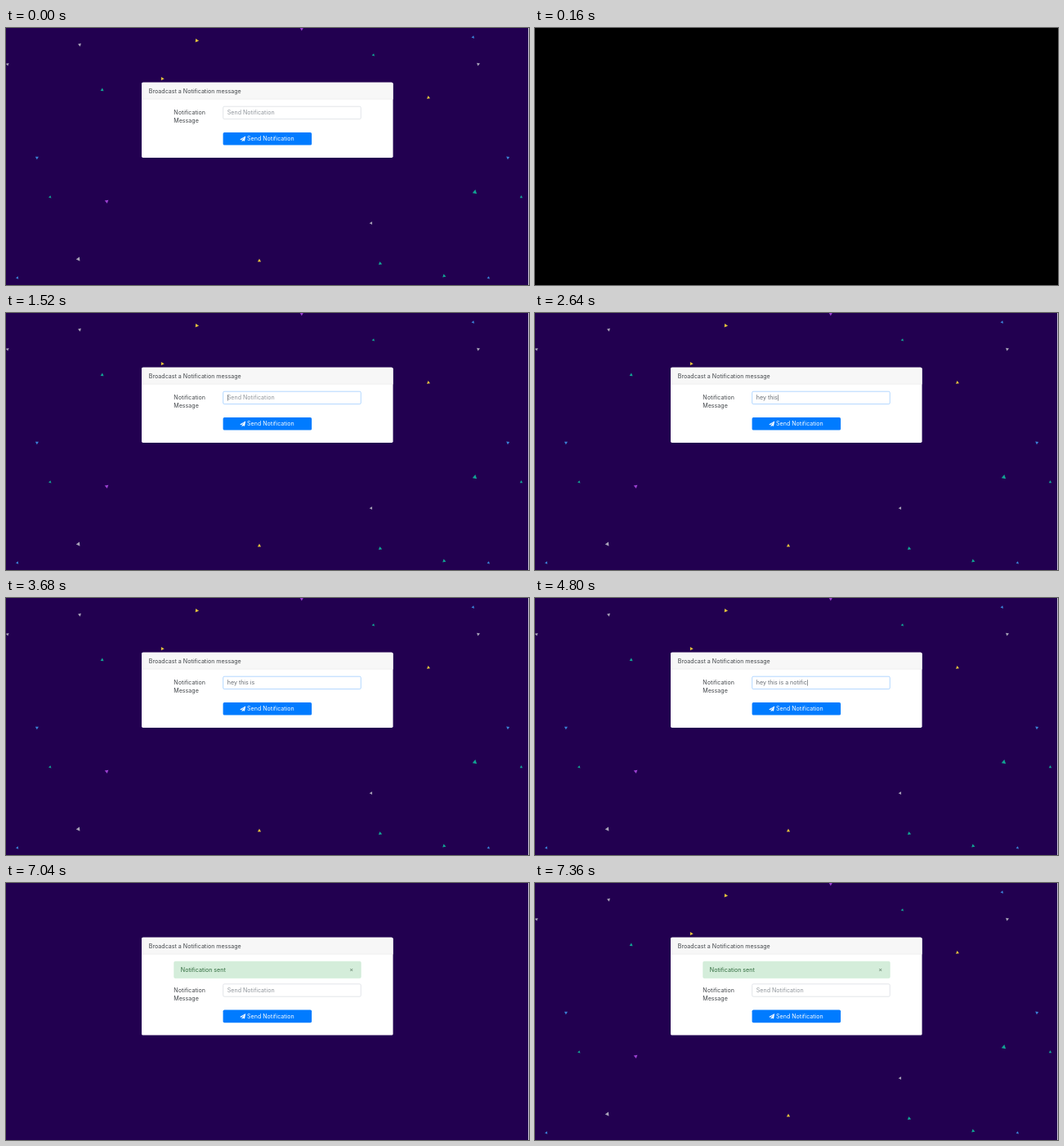
These frames come from a looping animation (640x315 px, 8000 ms). An HTML page:

```html
<!DOCTYPE html>
<html lang="en">
<head>
<meta charset="utf-8">
<title>Broadcast a Notification message</title>
<style>
  html, body { margin: 0; width: 100%; height: 100%; overflow: hidden; background: #220050; }
  svg { display: block; width: 100vw; height: 100vh; }
  text { font: 400 7.1px Inter, "Open Sans", sans-serif; fill: #43474b; white-space: pre; }
  #hint { fill: #8f959b; }
  #typed { fill: #686e75; font-size: 7.05px; }
  #alert text { fill: #2f6b3d; }
  #button text { fill: #fff; }
</style>
</head>
<body>
<svg viewBox="0 0 640 315" preserveAspectRatio="none">
  <rect width="640" height="315" fill="#220050"/>
  <g id="confetti"></g>
  <rect x="639" width="1" height="315" fill="#cfc8d8"/>

  <rect id="card" x="166" y="66.8" width="307.6" height="92.2" rx="1.7" fill="#fff"/>
  <path d="M166 87.2V68.5a1.7 1.7 0 0 1 1.7-1.7H471.9a1.7 1.7 0 0 1 1.7 1.7V87.2Z" fill="#f7f7f7"/>
  <path d="M166 87.2H473.6" stroke="#dfdfdf" stroke-width=".45"/>
  <text x="174.8" y="79.6">Broadcast a Notification message</text>

  <g id="alert">
    <rect x="205.7" y="96.2" width="228.6" height="20.4" rx="1.5" fill="#d4edda" stroke="#c3e6cb" stroke-width=".45"/>
    <text x="213.8" y="108.9">Notification sent</text>
    <path d="M421.2 105l3 3m0-3l-3 3" stroke="#5d7a65" stroke-width=".8"/>
  </g>

  <g id="form">
    <text x="205.3" y="106.4">Notification</text>
    <text x="205.3" y="116.4">Message</text>
    <rect id="field" x="265.7" y="96.2" width="168.6" height="15.4" rx="1.6" fill="#fff" stroke-width=".6"/>
    <text id="hint" x="270.8" y="106.4">Send Notification</text>
    <text id="typed" x="270.8" y="106.4"></text>
    <rect id="caret" y="100.2" width=".6" height="7.4" fill="#495057"/>
    <g id="button">
      <rect id="ring" x="264.7" y="127.1" width="110.3" height="17.4" rx="2.6" fill="none" stroke="#80bdff" stroke-width="1.4"/>
      <rect id="face" x="265.6" y="128" width="108.5" height="15.6" rx="1.7"/>
      <path transform="translate(286.2 132.4)" d="M7 0L0 4L1.7 4.8L6 1.2L2.5 5.2V7L3.7 5.6L5.8 6.4Z" fill="#fff"/>
      <text x="295" y="138.4">Send Notification</text>
    </g>
  </g>
  <rect id="blackout" width="640" height="315"/>
</svg>
<script>
const LOOP = 8000;
const MESSAGE = "hey this is a notification";
// Time of each keystroke
const KEYS = [
  1600, 1680, 1840, 1920,
  2400, 2480, 2560, 2640, 2880,
  3200, 3280, 3920, 4000, 4160,
  4240, 4400, 4480, 4560, 4640, 4720, 4800, 4960, 5040, 5120, 5280, 5360
];
// Caret switches on, off, on, ...
const BLINKS = [800, 1200, 1520, 2000, 2320, 2960, 3200, 3680, 3920, 5440, 5760, 6240];
const SENT = 7040;

const COLORS = { w: "#a9a3b8", y: "#e3c23c", p: "#9b3fd0", b: "#3b82d8", t: "#12a594" };
// colour, x, y, radius, turn in degrees
const CONFETTI = [
  ["w", 90.3, 20.3, 2.2, -45], ["y", 233.5, 15.4, 2.6, 5], ["p", 361.8, 1, 2.6, 90],
  ["b", 571.5, 11.2, 2, 165], ["t", 449.7, 33.2, 1.9, 45], ["w", 578, 44.2, 2.2, -20],
  ["w", 2, 44.4, 2, -40], ["y", 191.3, 62.2, 2.4, 0], ["t", 117.7, 75.8, 2.2, -85],
  ["y", 517, 85.4, 2.2, 25], ["b", 38, 158.8, 2.2, -30], ["b", 614, 158.8, 2.2, 215],
  ["t", 54, 207, 1.9, -80], ["p", 123.4, 212.3, 2.6, -40], ["t", 573.8, 200.9, 3, -80],
  ["t", 630.5, 207, 1.9, -90], ["w", 446.8, 239.2, 2.1, 180], ["w", 88.8, 283.4, 2.8, 55],
  ["y", 310, 285, 2.3, -90], ["t", 458, 288.8, 2.4, 20], ["b", 14, 306, 1.9, -70],
  ["t", 536.2, 304, 2.3, 20], ["b", 590.5, 306, 1.9, -80]
];

const $ = id => document.getElementById(id);
const show = (id, on) => $(id).setAttribute("visibility", on ? "visible" : "hidden");
const passed = (times, t) => times.filter(at => t >= at).length;
const clamp = v => Math.max(0, Math.min(1, v));

// Fade that advances once per 80 ms tick
const fade = (t, start, ticks) => clamp((Math.floor((t - start) / 80) + 1) / ticks);
const mix = (a, b, k) => `rgb(${a.map((v, i) => Math.round(v + (b[i] - v) * k))})`;

$("confetti").innerHTML = CONFETTI.map(([c, x, y, r, turn]) =>
  `<path d="M1 0L-.6 .9V-.9Z" fill="${COLORS[c]}" transform="translate(${x} ${y}) rotate(${turn}) scale(${r})"/>`
).join("");

function render(t) {
  const sent = t >= SENT;
  const count = sent ? 0 : passed(KEYS, t);
  const typed = $("typed");
  const text = MESSAGE.slice(0, count);
  if (typed.textContent !== text) typed.textContent = text;

  show("blackout", t >= 160 && t < 240);
  show("confetti", t < SENT || t >= 7360);
  show("alert", sent);
  show("hint", count === 0);
  show("caret", passed(BLINKS, t) % 2 === 1);
  show("ring", t >= 6640 && !sent);

  const width = count ? typed.getComputedTextLength() : 0;
  $("caret").setAttribute("x", 271 + width);

  const focus = sent ? 0 : fade(t, 800, 2) - fade(t, 6640, 2);
  $("field").setAttribute("stroke", mix([206, 212, 218], [128, 189, 255], focus));
  const hover = sent ? 0 : fade(t, 5920, 3);
  $("face").setAttribute("fill", mix([0, 123, 255], [0, 105, 217], hover));

  $("card").setAttribute("height", sent ? 119.8 : 92.2);
  $("form").setAttribute("transform", `translate(0 ${sent ? 27.6 : 0})`);
}

const start = performance.now();
function tick() {
  render((performance.now() - start) % LOOP);
  requestAnimationFrame(tick);
}
tick();
</script>
</body>
</html>
```
